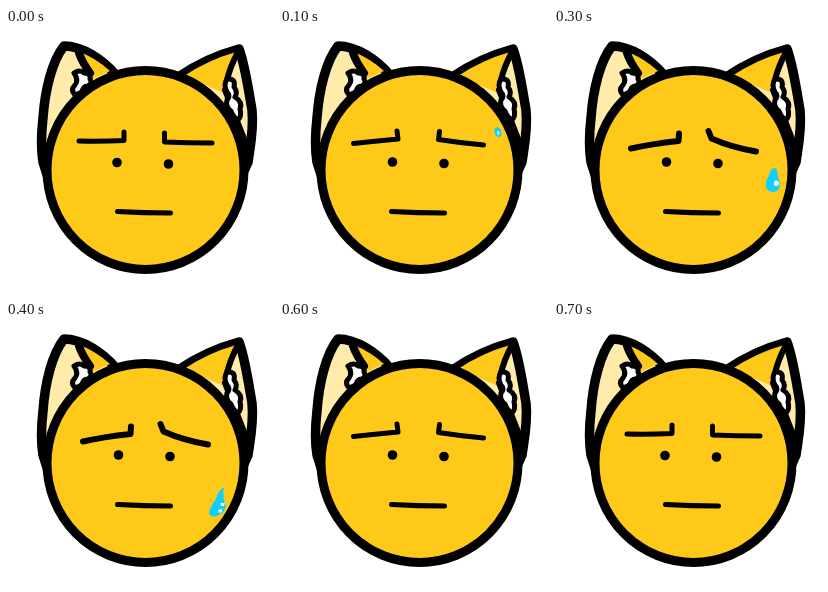
Recreate the animation shown at these times as an HTML page. Size 268 px wide and 265 px high, loop 2470 ms.

```html
<!DOCTYPE html>
<html lang="en">
<head>
<meta charset="utf-8">
<title>Worried cat face</title>
<style>
html, body { margin: 0; width: 100%; height: 100%; overflow: hidden; background: #fff; }
svg { display: block; width: 100vw; height: 100vh; }
.line { fill: none; stroke: #000; }
.line, .ear, .tuft { stroke-linecap: round; stroke-linejoin: round; }
.ear { fill: #ffebaa; stroke: #000; stroke-width: 9.500px; }
.inner, .head { fill: #ffc91a; }
.tuft { fill: #fff; stroke: #000; stroke-width: 5px; }
</style>
</head>
<body>
<svg viewBox="0 0 268 265">
  <path class="ear" d="M58 18C46 33 39 62 37 90Q34 116 37 134L44 156L110 47C97 32 77 18 58 18Z"/>
  <path class="inner" d="M74 24Q91 31 104 43L80 54Z"/>
  <path class="line" d="M73 25Q76 34 84 45" stroke-width="8"/>
  <path class="tuft" d="M68 45Q74 41 78 45Q85 45 84 51Q87 55 82 58Q77 58 76 64L69 67Q64 62 69 57Q73 52 68 45Z"/>

  <path class="ear" d="M233 21C239 37 242 59 246 82C248 102 244 120 242 134L233 154L174 48Q200 30 233 21Z"/>
  <path class="inner" d="M178 48Q202 32 230 24L218 65Z"/>
  <path class="line" d="M232 24Q224 39 221 52M219 62L242 121" stroke-width="6"/>
  <path class="tuft" d="M221 51Q230 50 228 59Q232 64 229 69Q237 74 234 81Q236 88 232 92Q227 89 225 83Q219 79 221 72Q225 68 221 64Q217 57 221 51Z"/>

  <ellipse class="head" cx="139.500" cy="142" rx="98.500" ry="99.500" stroke="#000" stroke-width="9"/>
  <path id="brows" class="line"/>
  <g id="eyes"><circle cx="111" cy="134.500" r="4.800"/><circle cx="162.500" cy="136" r="4.800"/></g>
  <path class="line" d="M111.500 183.500Q137 185 164.500 185" stroke-width="5"/>
  <g id="drop"><path id="water" fill="#12cfff"/><path id="shine" fill="#d8fbff"/></g>
</svg>
<script>
const LOOP = 2470;
const el = id => document.getElementById(id);

const brows = {
  flat: "M73 113Q96 113.500 118 112.500V104M158.500 105V114Q182 115 206 115",
  raised: "M73.500 115.500Q97 113 118 111L117 103M159.500 103.500L158.500 111.500Q181 115 203.500 117",
  worried: "M77 120.500Q97 116 124.500 113L125 105.500M154.500 103L157.500 110.500Q178 119.500 202 123.500"
};

// water outline and highlight
const drops = {
  none: ["", ""],
  bead: ["M217 99C213 100 214 108 218 109C223 110 223 101 217 99Z", "M217 103l3 1l-1 3l-2 -1Z"],
  tear: ["M220 107C216 108 216 113 213 118C210 126 213 131 219 131C225 131 227 126 225 119C223 113 224 107 220 107Z", "M222 119q3 1 3 4q-2 4 -5 1q-1 -3 2 -5Z"],
  flame: ["M218 166Q211 171 210 178Q203 187 203 193Q205 197 211 195Q219 192 220 184Q216 178 218 166Z", "M214 182l5 0l-1 3l-3 0ZM212 189l4 -1l0 3l-3 1Z"],
  spark: ["M204 203C202 208 206 212 205 217C203 225 192 224 192 217C192 211 199 209 204 203Z", "M197 211q4 0 3 5q-3 4 -5 1Z"]
};

// start time, brows, drop shape, drop offset
const steps = [
  [0, "flat", "none"],
  [100, "raised", "bead"],
  [230, "worried", "tear"],
  [300, "worried", "tear", "0 33"],
  [400, "worried", "flame"],
  [530, "raised", "spark"],
  [600, "raised", "none"],
  [700, "flat", "none"]
];

function draw(ms) {
  const t = ms % LOOP;
  const [, brow, drop, shift = "0 0"] = steps.filter(s => s[0] <= t).pop();
  el("brows").setAttribute("d", brows[brow]);
  el("brows").setAttribute("stroke-width", brow === "worried" ? 6 : 5);
  el("eyes").setAttribute("transform", brow === "flat" ? "" : "translate(1.500 -.5)");
  el("water").setAttribute("d", drops[drop][0]);
  el("shine").setAttribute("d", drops[drop][1]);
  el("drop").setAttribute("transform", `translate(${shift})`);
}

const start = performance.now();
function tick() {
  draw(performance.now() - start);
  requestAnimationFrame(tick);
}
tick();
</script>
</body>
</html>
```
